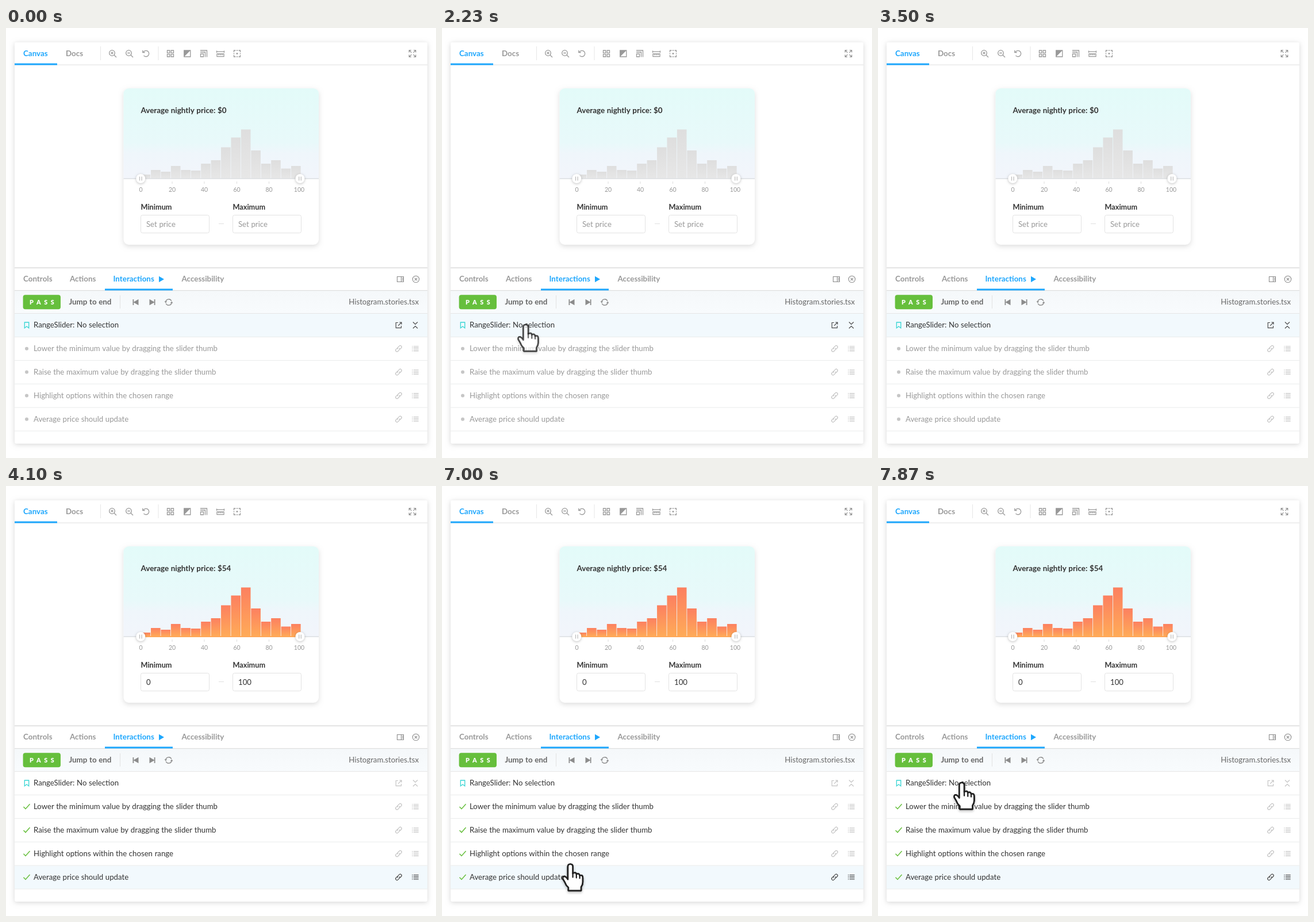
Write an HTML page with a canvas that moves like this. It is 748 px wide and 748 px high and loops after 8000 ms.

```html
<!DOCTYPE html>
<html lang="en">
<head>
<meta charset="utf-8">
<title>Interactions panel</title>
<style>
  html, body { margin: 0; width: 100%; height: 100%; overflow: hidden; background: #fff; }
  canvas { display: block; width: 748px; height: 748px; }
</style>
</head>
<body>
<canvas id="stage"></canvas>
<script>
const SIZE = 748, LOOP = 8000;
const canvas = document.getElementById('stage');
const dpr = window.devicePixelRatio || 1;
canvas.width = canvas.height = SIZE * dpr;
const c = canvas.getContext('2d');

const BLUE = '#1ea7fd', GREY = '#999', INK = '#333', RULE = '#e6e6e6', PALE = '#c4c4c4';
const STEPS = ['Lower the minimum value by dragging the slider thumb',
  'Raise the maximum value by dragging the slider thumb',
  'Highlight options within the chosen range',
  'Average price should update'];
const BARS = [7, 15, 12, 22, 15, 14, 26, 32, 54.5, 71.5, 85.5, 49, 26, 32, 17.5, 22];
const HAND = 'M-4.5 5Q-4.5 0 0 0Q4.5 0 4.5 5V17Q10.5 14 11 18.5Q16 16 17 21Q22.5 19 22.5 25V33Q22.5 38 19.5 42V48.5H-3.5V43Q-8 39 -10 33L-13.5 27Q-14.5 22 -10 22.5Q-7 24 -4.5 28Z';

// ---- drawing helpers ----
function text(s, x, y, color, { weight = 400, size = 13.2, align = 'left', gap = 0 } = {}) {
  c.font = `${weight} ${size}px Lato, "Open Sans", sans-serif`;
  c.letterSpacing = gap + 'px';
  c.wordSpacing = '0.3px';
  c.textAlign = align;
  c.fillStyle = color;
  c.fillText(s, x, y);
}
const bold = (s, x, y, color, opt) => text(s, x, y, color, { weight: 700, size: 13.4, ...opt });

function rect(x, y, w, h, color) {
  c.fillStyle = color;
  c.fillRect(x, y, w, h);
}

function box(x, y, w, h, r, fill, stroke) {
  c.beginPath();
  c.roundRect(x, y, w, h, r);
  if (fill) { c.fillStyle = fill; c.fill(); }
  if (stroke) { c.strokeStyle = stroke; c.lineWidth = 1; c.stroke(); }
}

function disc(x, y, r, color) {
  c.beginPath();
  c.arc(x, y, r, 0, 7);
  c.fillStyle = color;
  c.fill();
}

function shadow(color, blur, dy, draw) {
  c.save();
  c.shadowColor = color;
  c.shadowBlur = blur * dpr;
  c.shadowOffsetY = dy * dpr;
  draw();
  c.restore();
}

// Path data is relative to the icon centre.
function icon(x, y, color, line, fill, width = 1.3) {
  c.save();
  c.translate(x, y);
  c.lineWidth = width;
  c.strokeStyle = c.fillStyle = color;
  if (line) c.stroke(new Path2D(line));
  if (fill) c.fill(new Path2D(fill));
  c.restore();
}

function fade(y0, y1, ...colors) {
  const g = c.createLinearGradient(0, y0, 0, y1);
  colors.forEach((k, i) => g.addColorStop(i / (colors.length - 1), k));
  return g;
}

// ---- parts ----
function toolbar() {
  bold('Canvas', 30, 49, BLUE);
  bold('Docs', 104, 49, GREY);
  rect(15, 63.5, 718, 1.3, RULE);
  rect(15, 61.5, 74, 3, BLUE);
  rect(164, 32, 1, 24, RULE);
  rect(264.5, 32, 1, 24, RULE);

  const lens = 'M3.8 -1A4.8 4.8 0 1 1 -5.8 -1A4.8 4.8 0 1 1 3.8 -1M2.5 2.5L6.5 6.5M-3.3 -1H1.3';
  icon(185.5, 44.5, GREY, lens + 'M-1 -3.3V1.3');
  icon(214.5, 44.5, GREY, lens);
  icon(243.5, 44.5, GREY, 'M-4.8 -2A5.2 5.2 0 1 1 -4 3.4M-5.7 -5.8V-1.8H-1.7');
  icon(286, 44.5, GREY, 'M-5.5 -5.5H-1.2V-1.2H-5.5ZM1.2 -5.5H5.5V-1.2H1.2ZM-5.5 1.2H-1.2V5.5H-5.5ZM1.2 1.2H5.5V5.5H1.2Z');
  icon(315.3, 44.5, GREY, 'M-5.5 -5.5H5.5V5.5H-5.5Z', 'M-5.5 -5.5H5.5L-5.5 5.5Z');
  icon(344, 44.5, GREY, 'M-6 -5.5H5.5V6M-6 -2.5H2.5V6M-5.5 .5H-.5V5.5H-5.5Z');
  icon(373, 44.5, GREY, 'M-6.5 -5V-1.5M6.5 -5V-1.5M-6.5 -3.3H6.5M-6 .5H6V5.2H-6ZM-3 .5V3M0 .5V3M3 .5V3');
  icon(402, 44.5, GREY, 'M-5.5 -2.5V-5.5H-2.5M2.5 -5.5H5.5V-2.5M5.5 2.5V5.5H2.5M-2.5 5.5H-5.5V2.5M-1 -5.5H1M-1 5.5H1M-5.5 -1V1M5.5 -1V1M-1.5 0H1.5M0 -1.5V1.5');
  icon(707, 44.5, '#858585', 'M-5.8 -2V-5.8H-2M2 -5.8H5.8V-2M5.8 2V5.8H2M-2 5.8H-5.8V2M-5.8 -5.8L-1.6 -1.6M5.8 -5.8L1.6 -1.6M5.8 5.8L1.6 1.6M-5.8 5.8L-1.6 1.6', '', 1.1);
}

function thumb(x) {
  shadow('rgba(0,0,0,.25)', 4, 1, () => disc(x, 262, 8, '#fff'));
  icon(x, 262, '#b5b5b5', 'M-1.8 -3.5V3.5M1.8 -3.5V3.5', '', 1.1);
}

function field(label, x, value, done) {
  bold(label, x + .5, 316, INK, { size: 12.7 });
  box(x + .5, 325.5, 119, 31, 3, '#fff', '#e2e2e2');
  text(value, x + 10, 345.5, done ? INK : GREY);
}

function card(done) {
  shadow('rgba(0,0,0,.13)', 9, 3, () => box(204.5, 105, 339.5, 272, 9, '#fff'));
  c.beginPath();
  c.roundRect(204.5, 105, 339.5, 157, [9, 9, 0, 0]);
  const sky = fade(105, 262, '#e3fbf9', '#f2f5fb');
  sky.addColorStop(.6, '#e8f9fa');
  sky.addColorStop(.72, '#eff6fb');
  c.fillStyle = sky;
  c.fill();
  bold('Average nightly price: $' + (done ? 54 : 0), 234.5, 147.5, INK, { size: 13.45 });

  BARS.forEach((h, i) => {
    const top = 262 - h;
    rect(234.6 + i * 17.43, top, 16.6, h,
      done ? fade(top, 262, '#fc8060', '#ffab58') : fade(top, 262, '#dedede', '#e7e7e7'));
  });
  rect(204.5, 261.3, 339.5, 1.5, '#dcdfe2');
  if (done) rect(234.5, 261, 277, 2, '#ffa757');
  [234.5, 289, 345, 401.5, 457.5, 510].forEach((x, i) => {
    if (i % 5) rect(x - .5, 267, 1, 4, '#dedede');
    text(String(i * 20), x, 284.5, GREY, { size: 10.5, align: 'center' });
  });
  thumb(234.3);
  thumb(511.5);

  field('Minimum', 234, done ? '0' : 'Set price', done);
  field('Maximum', 394, done ? '100' : 'Set price', done);
  rect(370, 340, 9, 1, '#e0e0e0');
}

function panelHead() {
  rect(15, 416.5, 718, 1.4, '#dadada');
  rect(15, 457, 718, 39, fade(457, 496, '#f5f8fa', '#f8fbfd'));
  rect(15, 456, 718, 1.2, '#dedede');
  rect(15, 496, 718, 1, RULE);
  bold('Controls', 30, 441.2, GREY);
  bold('Actions', 111, 441.2, GREY);
  bold('Interactions', 186.5, 441.2, BLUE);
  bold('Accessibility', 305.5, 441.2, GREY);
  rect(172, 453.5, 118, 3, BLUE);
  icon(270, 437, BLUE, '', 'M-4 -5.2L5 0L-4 5.2Z');
  icon(686, 437, '#8c8c8c', 'M-5.5 -4.5H5.5V4.5H-5.5ZM1.5 -4.5V4.5M3 -2H5M3 0H5M3 2H5', '', 1.1);
  icon(713, 437, '#8c8c8c', 'M5.7 0A5.7 5.7 0 1 1 -5.7 0A5.7 5.7 0 1 1 5.7 0M-2.3 -2.3L2.3 2.3M2.3 -2.3L-2.3 2.3', '', 1.1);

  box(29.6, 464.3, 65.4, 25, 4, '#66bf3c');
  text('PASS', 41, 481, '#fff', { weight: 900, size: 10.8, gap: 5.6 });
  bold('Jump to end', 109.5, 481.2, '#666');
  rect(198, 465, 1, 23, '#e2e2e2');
  icon(225.5, 477, '#8c8c8c', '', 'M5 -5.2V5.2L-3.2 .6V5H-5V-5H-3.2V-.6Z');
  icon(254.5, 477, '#8c8c8c', '', 'M-5 -5.2V5.2L3.2 .6V5H5V-5H3.2V-.6Z');
  icon(283, 477, '#8c8c8c', 'M-5.2 -1A5.3 5.3 0 0 1 4.8 -2.2M5.2 1A5.3 5.3 0 0 1 -4.8 2.2', 'M-7.5 -1.6H-2.8L-5.2 1.4ZM7.5 1.6H2.8L5.2 -1.4Z');
  text('Histogram.stories.tsx', 718, 481.2, '#666', { align: 'right' });
}

function rows(done) {
  const active = done ? 4 : 0;
  rect(15, 497 + active * 40.9, 718, 40, '#f2f9fd');
  for (let i = 1; i <= 5; i++) rect(15, 496 + i * 40.9, 718, 1, '#e9ebec');

  const tone = i => i === active ? '#4c4c4c' : PALE;
  icon(36, 517, '#37d5d3', 'M-3.7 -5H3.7V5L0 2L-3.7 5Z');
  text('RangeSlider: No selection', 48, 521, INK);
  icon(683, 517, tone(0), 'M-1 -4.5H-4.7V4.7H4.5V1M1.3 -5H5V-1.3M5 -5L-.8 .8', '', 1.2);
  icon(712, 517, tone(0), 'M-4 -5.5L0 -1.5L4 -5.5M-4 5.5L0 1.5L4 5.5', '', 1.2);

  STEPS.forEach((s, k) => {
    const y = 557.7 + k * 40.9, color = tone(k + 1);
    if (done) icon(36, y, '#66bf3c', 'M-5.5 .3L-2 4L5.5 -4.5', '', 1.5);
    else disc(36, y, 3, '#c6c6c6');
    text(s, 48, y + 4.1, done ? INK : GREY);
    c.save();
    c.translate(683, y);
    c.rotate(-Math.PI / 4);
    icon(0, 0, color, 'M-.8 -2.4H-4A2.4 2.4 0 0 0 -4 2.4H-.8A2.4 2.4 0 0 0 1.4 0M.8 2.4H4A2.4 2.4 0 0 0 4 -2.4H.8A2.4 2.4 0 0 0 -1.4 0', '', 1.2);
    c.restore();
    const lines = [-3.9, -1.3, 1.3, 3.9].map(d => `M-5.7 ${d}H-4.3M-3 ${d}H5.7`).join('');
    icon(712, y, color, lines, '', 1.1);
  });
}

// ---- motion ----
const clamp = v => Math.min(1, Math.max(0, v));
const ease = u => u < .5 ? 4 * u ** 3 : 1 - 4 * (1 - u) ** 3;

function hand(p, alpha) {
  const x = 145.7 + 82 * (p + .62 * p * (1 - p)), y = 516 + 161 * p;
  const shape = new Path2D(HAND);
  c.save();
  c.globalAlpha = alpha;
  c.translate(x, y);
  c.scale(.96, .95);
  c.lineJoin = c.lineCap = 'round';
  c.lineWidth = 2.8;
  c.strokeStyle = '#222';
  c.fillStyle = '#fff';
  shadow('rgba(0,0,0,.35)', 4, 2, () => c.stroke(shape));
  c.fill(shape);
  c.stroke(shape);
  c.lineWidth = 2.4;
  c.stroke(new Path2D('M4.5 16V24M11 19V25M17 21V26'));
  c.restore();
}

function cursor(t) {
  if (t >= 2230 && t < 3500) {
    const alpha = t >= 3370 ? .45 : .65 + .35 * clamp((t - 2230) / 700);
    hand(ease(clamp((t - 2230) / 860)), alpha);
  } else if (t >= 6730) {
    hand(1 - ease(clamp((t - 6730) / 870)), .6 + .4 * clamp((t - 6730) / 250));
  }
}

// The picture advances four times per half second.
function snap(t) {
  const r = t % 500;
  return t - r + [370, 230, 100, 0].find(s => s <= r);
}

function draw(now) {
  const t = snap(now % LOOP), done = t >= 3600;
  c.setTransform(dpr, 0, 0, dpr, 0, 0);
  rect(0, 0, SIZE, SIZE, '#fff');
  shadow('rgba(0,0,0,.16)', 8, 1.5, () => box(15, 25, 718, 698, 3, '#fff'));
  toolbar();
  card(done);
  panelHead();
  rows(done);
  cursor(t);
}

const start = performance.now();
function tick() {
  draw(performance.now() - start);
  requestAnimationFrame(tick);
}
tick();
</script>
</body>
</html>
```
